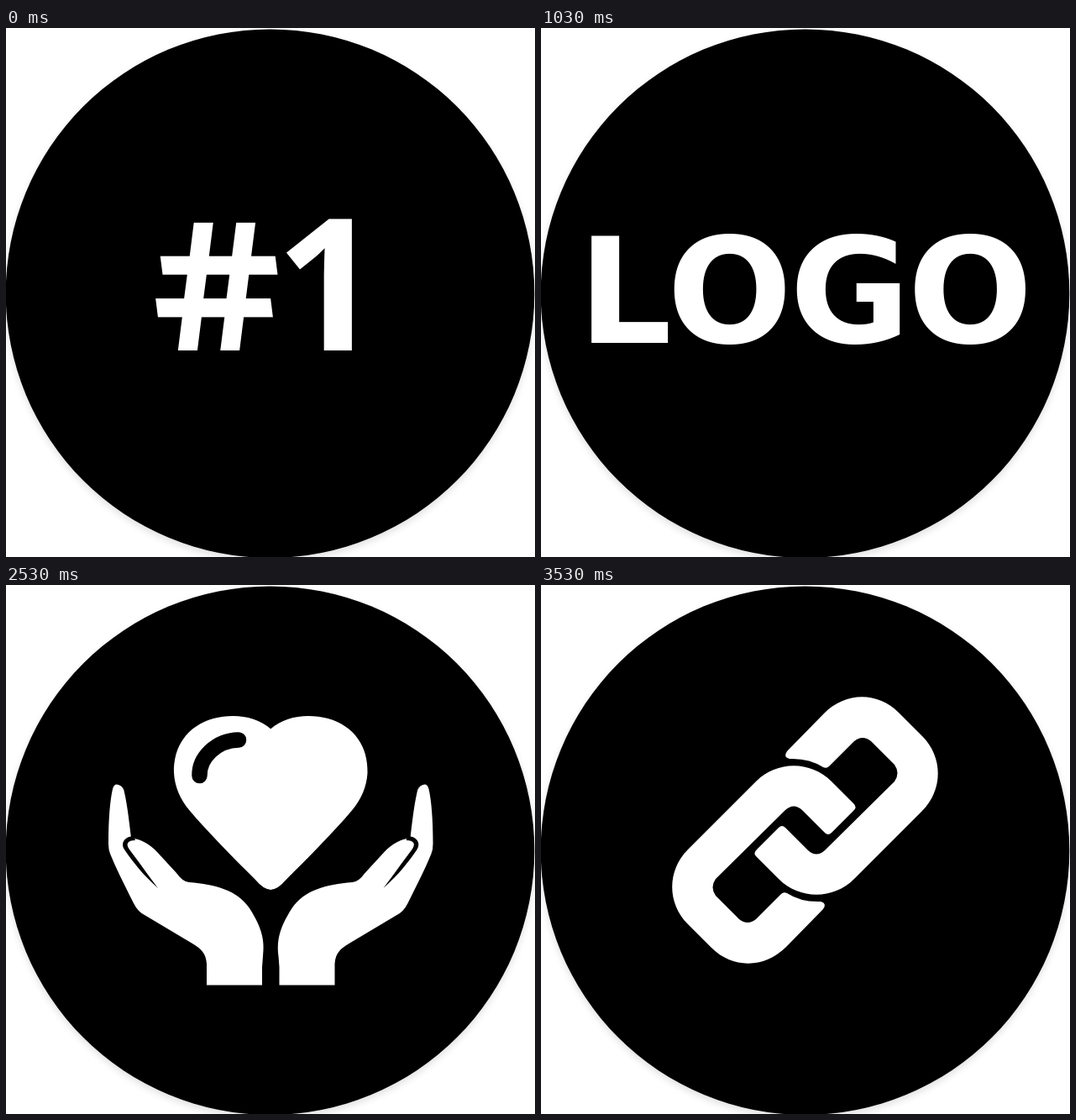
An HTML page with a canvas that plays this animation: 630 px wide and 630 px high, repeating every 4030 ms.

```html
<!DOCTYPE html>
<html lang="en">
<head>
<meta charset="utf-8">
<title>Badge slideshow</title>
<style>
  html, body { margin: 0; width: 100%; height: 100%; overflow: hidden; background: #fff; }
  canvas { display: block; }
</style>
</head>
<body>
<canvas id="stage" width="630" height="630"></canvas>
<script>
const ctx = document.getElementById('stage').getContext('2d');
const LOOP = 4030, STEP = 500, FIRST_EXTRA = 30;

function fill(d, color = '#fff') {
  ctx.fillStyle = color;
  ctx.fill(new Path2D(d));
}

function line(d, width = 2, color = '#000') {
  ctx.lineWidth = width;
  ctx.strokeStyle = color;
  ctx.stroke(new Path2D(d));
}

function transformed(matrix, draw) {
  ctx.save();
  ctx.transform(...matrix);
  draw();
  ctx.restore();
}

// Centres the ink of one character on x.
function glyph(char, x, baseline, size, family) {
  ctx.font = `bold ${size}px "${family}", sans-serif`;
  ctx.fillStyle = '#fff';
  const ink = ctx.measureText(char);
  ctx.fillText(char, x - (ink.actualBoundingBoxRight - ink.actualBoundingBoxLeft) / 2, baseline);
}

const word = (text, centers) => () =>
  [...text].forEach((char, i) => glyph(char, centers[i], 375, 175.6, 'DejaVu Sans'));

function numberOne() {
  // A slight shear makes the sign more upright.
  transformed([1, 0, .125, 1, 251, 308], () => glyph('#', 0, 76, 212, 'DejaVu Sans'));
  glyph('1', 373, 384, 220, 'Open Sans');
}

function badge() {
  ctx.fillStyle = '#fff';
  ctx.fillRect(0, 0, 630, 630);
  ctx.save();
  ctx.shadowColor = 'rgba(0,0,0,.12)';
  ctx.shadowBlur = 9;
  ctx.shadowOffsetY = 4;
  ctx.fillStyle = '#000';
  ctx.beginPath();
  ctx.arc(314.5, 316.2, 314.8, 0, Math.PI * 2);
  ctx.fill();
  ctx.restore();
}

function heartInHands() {
  const half = () => {
    fill('M316 172C297 155 270 153 247 159C216 168 199 192 200 224C201 240 207 255 219 269C240 294 272 326 297 351Q307 363 316 363Z');
    fill('M122 308C122 278 124 256 127 243Q129 236 134 238Q140 240 141 247C145 265 147 285 149 301C160 303 171 308 180 318L203 343Q211 354 218 354C250 357 275 363 290 385C306 410 308 425 306 442L305 455V476.5H239V451C238 438 232 433 222 427L165 393Q157 389 152 379C140 355 130 335 124 320Q122 315 122 308Z');
    fill('M152 299C139 300 137 309 141 315C152 331 163 345 181 361C168 344 160 332 147 315C142 308 145 304 154 304Z', '#000');
  };
  half();
  transformed([-1, 0, 0, 1, 630.5, 0], half);
  line('M230.5 227C230 206 250 185 277 184.5', 18.5);
}

function chain() {
  const link = () => fill('M372 269L346 295Q342 299 338 295L311 268Q301 259 291 268L208 350Q201 360 208 370L236 398Q246 406 256 398L286 368Q289 365 293 367Q310 378 333 377Q341 379 336 386L292 431C266 457 228 457 203 432L175 404C150 379 150 340 175 315L256 234C281 209 321 209 346 234L372 260Q377 264.5 372 269Z');
  link();
  transformed([-1, 0, 0, -1, 629, 584], link);
}

function finger(x1, y1, x2, y2, r1, r2 = r1) {
  const a = Math.atan2(y2 - y1, x2 - x1), q = Math.PI / 2;
  ctx.beginPath();
  ctx.arc(x1, y1, r1, a + q, a - q);
  ctx.arc(x2, y2, r2, a - q, a + q);
  ctx.closePath();
  ctx.fillStyle = '#fff';
  ctx.fill();
  ctx.lineWidth = 1.6;
  ctx.strokeStyle = '#000';
  ctx.stroke();
}

function nail(x, y, w, h, angle) {
  transformed([Math.cos(angle), Math.sin(angle), -Math.sin(angle), Math.cos(angle), x, y], () => {
    ctx.beginPath();
    ctx.roundRect(-w / 2, -h / 2, w, h, Math.min(w, h) * .28);
    ctx.lineWidth = 1.8;
    ctx.strokeStyle = '#000';
    ctx.stroke();
    line(`M${-w * .22} ${-h * .2}Q${-w * .3} 0 ${-w * .2} ${h * .12}`, 1);
  });
}

function eye(x, y, r) {
  ctx.fillStyle = '#000';
  ctx.beginPath();
  ctx.ellipse(x, y, r, r * .9, 0, 0, Math.PI * 2);
  ctx.fill();
  ctx.fillStyle = '#fff';
  ctx.beginPath();
  ctx.arc(x - r * .3, y - 3, r * .29, 0, Math.PI * 2);
  ctx.fill();
}

function lashes(x1, x2, y, bend, length) {
  for (let x = x1; x <= x2; x += 4) {
    const u = (x - x1) / (x2 - x1);
    const top = y + bend * Math.sin(u * Math.PI);
    line(`M${x} ${top}q1 ${length * .6} ${u * 8 - 4} ${length * (.7 + .3 * Math.sin(x))}`, 1);
  }
}

function face() {
  const innerTear = 'L207 252L212 240L218 228L229 221L235 210L248 198L257 189L268 176L281 168L290 160L303 154L323 143Z';
  fill('M319 125L315 130L308 133L304 137L296 140L290 145L281 147L273 152L264 157L258 161L247 169L243 179L235 185L231 196L218 204L213 213L207 220L202 233L200 244L197 251' + innerTear, '#878787');
  fill('M323 141L327 168L337 191L348 210L357 232L368 244L378 248L388 240L394 222L398 212L405 207L414 196L420 207L432 211L438 218L443 236L440 250L429 260L428 372L392 423L379 409L358 396L329 383L313 370L307 365L301 369L291 380L273 397L259 416L246 437L240 440L232 450L228 450L225 459L219 452L214 453L203 443Q209 416 211 390L205 352L197 329V278' + innerTear);

  // Brows
  fill('M193 251L207 252Q226 262 237 277L239 284L243 296L234 290Q218 275 196 274Z', '#000');
  fill('M331 292C342 271 363 254 386 248L420 243L441 245L437 251C407 256 385 268 370 280L362 279L355 285L350 282L343 288L341 284Z', '#000');

  // Eyes
  fill('M196 299Q218 291 234 306L253 325L246 326Q228 307 196 303Z', '#000');
  eye(215, 315, 16);
  line('M198 328Q219 337 250 327', 1.5);
  lashes(207, 242, 332, 3, 14);
  fill('M342 319C357 294 386 282 409 293L426 306L423 314Q409 298 387 298Q365 301 342 319Z', '#000');
  fill('M411 300L426 306L421 317L412 323Z', '#000');
  eye(386, 314, 19);
  line('M346 324Q362 335 387 333T421 320', 1.5);
  lashes(352, 415, 332, 3, 12);
  for (let x = 347; x < 372; x += 5) line(`M${x} ${313 - (x - 347) * .6}l-9 -10`, 1);
  for (let x = 212; x < 240; x += 6) line(`M${x} ${294 + (x - 212) * .5}l3 -6`, 1);
  line('M357 296Q382 279 423 287', 1.5);

  // Frown and cheek
  line('M282 288Q282 298 278 305', 2.5);
  line('M317 269Q307 278 303 303', 2.5);
  line('M243 302C276 320 281 344 269 378', 2.5);
  line('M257 398Q247 407 246 427', 2);

  // Left hand
  finger(140, 365, 181, 389, 20, 23);
  finger(100, 308, 159, 326, 22, 26);
  finger(82, 266, 137, 266, 20, 25);
  nail(89, 265, 30, 23, -.05);
  nail(104, 307, 30, 29, .1);
  nail(141, 365, 28, 24, .1);
  line('M120 251q9 11 4 25', 2.5);
  line('M168 311q9 11 3 25', 2.5);
  line('M181 372q4 10 -1 20', 2.5);

  // Right hand
  fill('M439 218L451 184L488 224L496 247L482 263L440 253Z', '#000');
  finger(457, 196, 469, 216, 15, 18);
  nail(467, 213, 20, 24, -.45);
  fill('M428 258Q448 247 479 252Q490 254 489 263L462 288L430 286Z');
  line('M427 284Q425 265 441 257T484 261', 1.8);
  finger(452, 287, 542, 314, 25, 16);
  finger(443, 338, 552, 355, 22, 18);
  line('M433 291Q438 272 447 263', 2);
  line('M427 337Q431 326 437 321', 2);
  nail(538, 314, 34, 24, .08);
  nail(553, 353, 30, 28, .08);
  line('M484 291q6 9 -1 21', 2.5);
  line('M502 338q-4 11 0 22', 2.5);
  fill('M390 400L420 370Q437 358 454 376L450 400L420 415Z');
  finger(412, 409, 439, 411, 23, 22);
  fill('M393 395Q408 369 431 366Q447 366 454 377L442 388L416 401L397 412Z');
  line('M391 408Q389 390 405 378T434 364', 1.8);
  line('M427 379Q438 389 452 387', 1.8);
  line('M401 386Q397 404 407 419', 2.5);
  nail(439, 409, 33, 28, .08);
}

const scenes = [
  numberOne,
  word('YOUR', [111, 238, 383.5, 522.5]),
  word('LOGO', [106, 224.5, 366, 511]),
  word('GOES', [119, 264, 401.5, 516]),
  word('HERE', [130.5, 265, 391.5, 514.5]),
  heartInHands,
  face,
  chain
];

function render() {
  const time = performance.now() % LOOP;
  badge();
  scenes[Math.max(0, Math.floor((time - FIRST_EXTRA) / STEP))]();
  requestAnimationFrame(render);
}

ctx.lineCap = ctx.lineJoin = 'round';
render();
</script>
</body>
</html>
```
